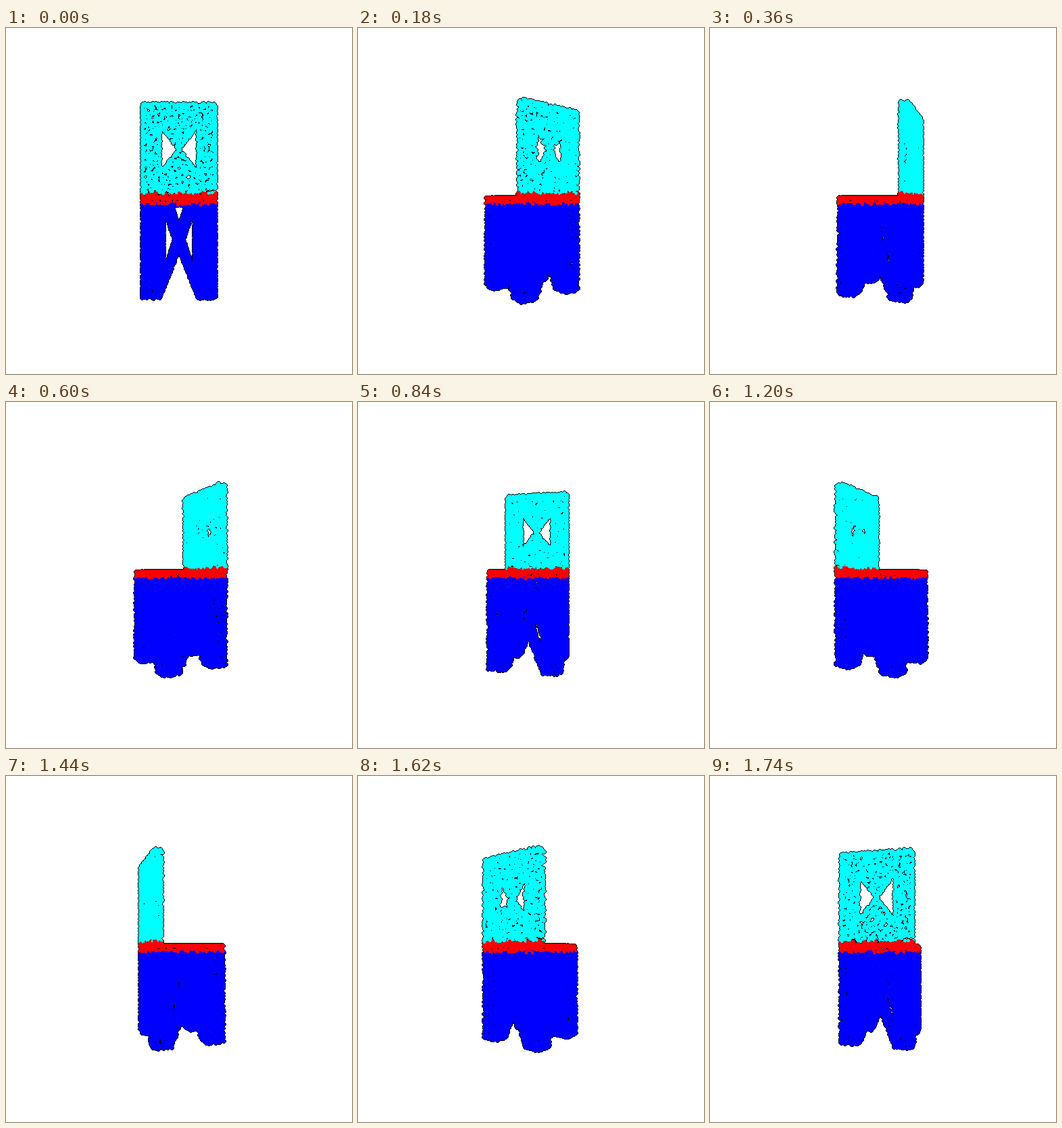
An HTML page with a canvas that plays this animation: 512 px wide and 512 px high, repeating every 1.8 s.

```html
<!DOCTYPE html>
<html lang="en">
<head>
<meta charset="utf-8">
<title>Turning chair</title>
<style>
  html, body { margin: 0; width: 100%; height: 100%; overflow: hidden; background: #fff; }
  canvas { display: block; width: 512px; height: 512px; }
</style>
</head>
<body>
<canvas id="stage" width="512" height="512"></canvas>
<script>
const SIZE = 512, MID = 255.5, CAMERA = 450;
const STEPS = 30, STEP_MS = 60;

// Chair measures, centred on the turning axis
const HALF = 49, TALL = 129, LEG = 25.2, BACK_IN = 38.5;
const SEAT_TOP = 5, SEAT_LOW = -5.5, BACK_LOW = 10.5;
const SPACING = 4.5, JITTER = 0.9;

// ABGR pixels
const WHITE = 0xffffffff, BLACK = 0xff000000;
const CYAN = 0xffffff00, RED = 0xff0000ff, BLUE = 0xffff0000;

let seed = 20177;
function random() {
  seed = (seed * 1664525 + 1013904223) >>> 0;
  return seed / 4294967296;
}

const points = [];
function addPoint(x, y, z) {
  const color = y > BACK_LOW ? CYAN : y > SEAT_LOW + 1 ? RED : BLUE;
  points.push({ x, y, z, color, sx: 0, sy: 0, depth: 0 });
}

// Scatters points evenly over a rectangle; place(a, b) puts them in space
function scatter(a0, a1, b0, b1, place) {
  const cols = Math.max(1, Math.round((a1 - a0) / SPACING));
  const rows = Math.max(1, Math.round((b1 - b0) / SPACING));
  const inCell = (from, to, i, count) =>
    from + (to - from) * (i + 0.5 + (random() - 0.5) * JITTER) / count;
  for (let i = 0; i < cols; i++)
    for (let j = 0; j < rows; j++)
      place(inCell(a0, a1, i, cols), inCell(b0, b1, j, rows));
}

function inTriangle([a, b, c], x, y) {
  const side = (p, q) => (q[0] - p[0]) * (y - p[1]) - (q[1] - p[1]) * (x - p[0]) > 0;
  const first = side(a, b);
  return first === side(b, c) && first === side(c, a);
}

const mirror = triangle => triangle.map(([x, y]) => [-x, y]);

// Walls of the openings, running through the thickness of a panel
function holeWalls(holes, near, far, low, high, place) {
  for (const hole of holes)
    hole.forEach((p, i) => {
      const q = hole[(i + 1) % 3];
      const length = Math.hypot(q[0] - p[0], q[1] - p[1]);
      scatter(0, length, near, far, (s, z) => {
        const x = p[0] + (q[0] - p[0]) * s / length;
        const y = p[1] + (q[1] - p[1]) * s / length;
        if (y > low && y < high) place(x, y, z);
      });
    });
}

function buildBase() {
  const gap = [[LEG, 2], [LEG, -119], [5, -54.5]];
  const holes = [
    gap, mirror(gap),
    [[0, -43], [11.5, SEAT_LOW], [-11.5, SEAT_LOW]],
    [[0, -65.8], [LEG + 0.6, -TALL - 1], [-LEG - 0.6, -TALL - 1]]
  ];
  const open = (x, y) => y < SEAT_LOW && holes.some(h => inTriangle(h, x, y));
  const turns = [[1, 0], [0, 1], [-1, 0], [0, -1]];
  for (const [c, s] of turns) {
    const place = (x, y, z) => addPoint(x * c + z * s, y, z * c - x * s);
    const panel = (z, top) => scatter(-HALF, HALF, -TALL, top, (x, y) => {
      if (!open(x, y)) place(x, y, z);
    });
    panel(HALF, SEAT_TOP);
    panel(LEG, SEAT_LOW);
    holeWalls(holes, LEG, HALF, -TALL, SEAT_LOW, place);
    scatter(LEG, HALF, LEG, HALF, (x, z) => place(x, -TALL, z));
  }
  for (const y of [SEAT_TOP, SEAT_LOW])
    scatter(-HALF, HALF, -HALF, HALF, (x, z) => addPoint(x, y, z));
}

function buildBack() {
  const gap = [[25.5, 101.5], [25.5, 37.5], [0.2, 69]];
  const holes = [gap, mirror(gap)];
  for (const z of [HALF, BACK_IN])
    scatter(-HALF, HALF, SEAT_TOP, TALL, (x, y) => {
      if (!holes.some(h => inTriangle(h, x, y))) addPoint(x, y, z);
    });
  for (const x of [-HALF, HALF])
    scatter(SEAT_TOP, TALL, BACK_IN, HALF, (y, z) => addPoint(x, y, z));
  scatter(-HALF, HALF, BACK_IN, HALF, (x, z) => addPoint(x, TALL, z));
  holeWalls(holes, BACK_IN, HALF, SEAT_TOP, TALL, addPoint);
}

buildBase();
buildBack();

// Pixel offsets of a small disc
function disc(limit) {
  const offsets = [];
  for (let y = -3; y <= 3; y++)
    for (let x = -3; x <= 3; x++)
      if (x * x + y * y <= limit) offsets.push(y * SIZE + x);
  return offsets;
}
const rim = disc(10), dot = disc(5);

const context = document.getElementById("stage").getContext("2d");
const picture = context.createImageData(SIZE, SIZE);
const pixels = new Uint32Array(picture.data.buffer);

function stamp(point, offsets, color) {
  const at = point.sy * SIZE + point.sx;
  for (const offset of offsets) pixels[at + offset] = color;
}

function draw(step) {
  const angle = step / STEPS * 2 * Math.PI;
  const c = Math.cos(angle), s = Math.sin(angle);
  for (const p of points) {
    p.depth = p.z * c - p.x * s;
    const scale = CAMERA / (CAMERA - p.depth);
    p.sx = Math.round(MID + (p.x * c + p.z * s) * scale);
    p.sy = Math.round(MID - p.y * scale);
  }
  points.sort((a, b) => a.depth - b.depth);
  pixels.fill(WHITE);
  for (const p of points) stamp(p, rim, BLACK);
  for (const p of points) stamp(p, dot, p.color);
  context.putImageData(picture, 0, 0);
}

const start = performance.now();
let shown = 0;
function tick() {
  const step = Math.floor((performance.now() - start) / STEP_MS) % STEPS;
  if (step !== shown) draw(shown = step);
  requestAnimationFrame(tick);
}
draw(0);
requestAnimationFrame(tick);
</script>
</body>
</html>
```
